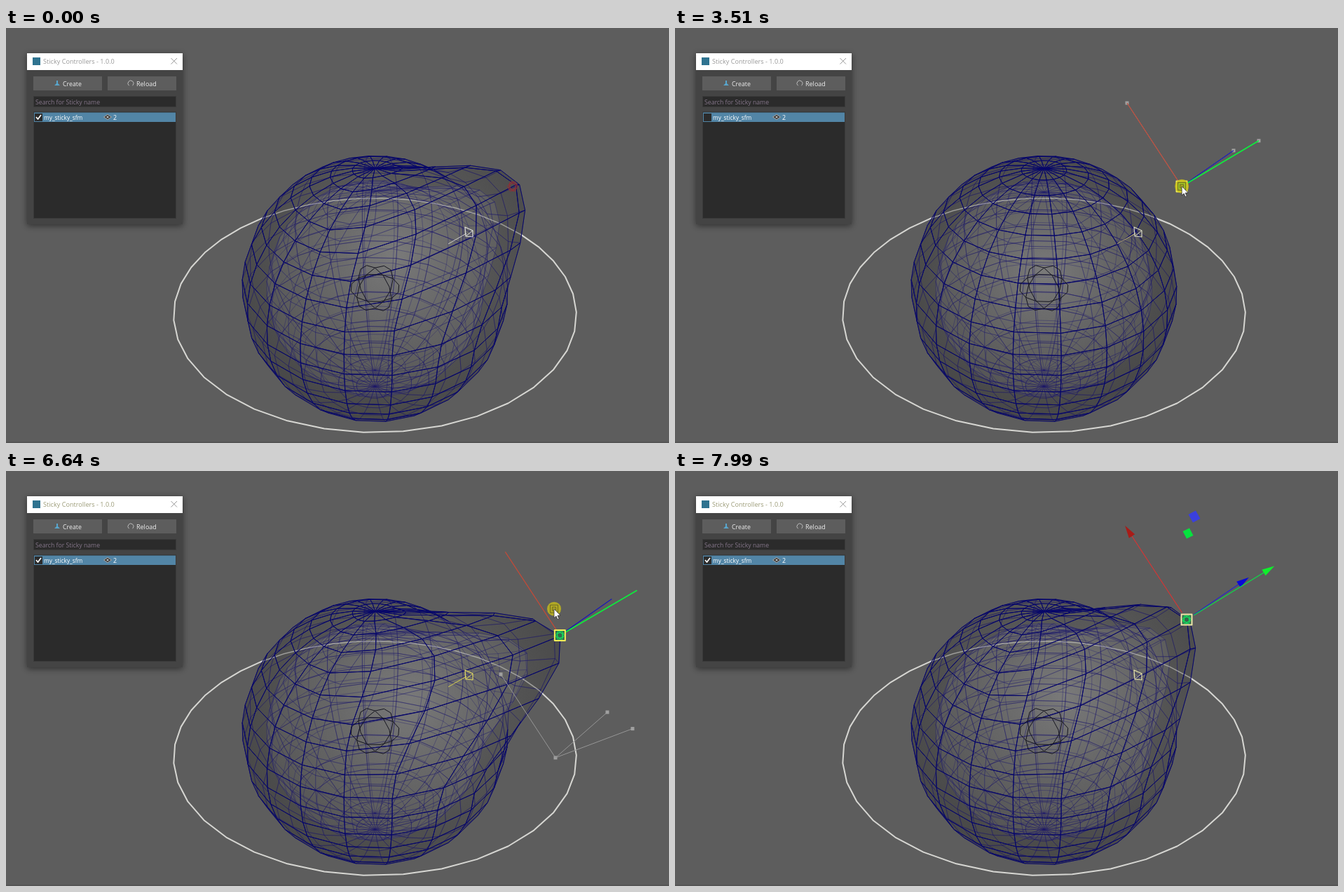
Animation of 946x592 px, one loop 8470 ms. Source, as an HTML page with a canvas:

```html
<!DOCTYPE html>
<html lang="en">
<head>
<meta charset="utf-8">
<title>Sticky Controllers</title>
<style>
html, body { margin: 0; width: 100%; height: 100%; overflow: hidden; background: #5d5d5d; }
canvas { display: block; }
</style>
</head>
<body>
<canvas id="stage" width="946" height="592"></canvas>
<script>
const ctx = document.getElementById('stage').getContext('2d');
const { sin, cos, hypot, min, max, PI } = Math;
const LOOP = 8470, RAD = PI / 180;

// Camera: pitch, yaw of the world axes, distance and focal length
const PITCH = 34.5 * RAD, YAW = 42.4 * RAD, DIST = 5.46, FOCAL = 1019;
const CX = 526.5, CY = 372;
const ANCHOR = [631, 308], HOME = [723, 226], PARKED = [784, 409];
const FALLOFF = 0.78;

// Cursor path: time, x, y
const PATH = [
  [270, 765, 358], [1090, 55, 138], [1160, 45, 128], [2690, 45, 128],
  [3440, 723, 226], [3510, 723, 226], [3790, 770, 168], [4070, 828, 190], [4280, 781, 201],
  [4400, 780, 202], [4770, 784, 409], [4840, 784, 409], [5220, 71, 140], [5360, 48, 124],
  [5840, 48, 124], [6110, 775, 402], [6180, 784, 409], [6450, 805, 300], [6640, 782, 197],
  [6900, 788, 108], [7060, 758, 140], [7240, 740, 145], [7400, 718, 170], [7580, 812, 160],
  [7780, 730, 212], [7919, 730, 212], [7920, 875, 481]
];

function cursorAt(t) {
  const i = PATH.findIndex(k => k[0] > t);
  if (i < 0) return PATH[PATH.length - 1].slice(1);
  if (i === 0) return PATH[0].slice(1);
  const [t0, x0, y0] = PATH[i - 1], [t1, x1, y1] = PATH[i];
  const u = (t - t0) / (t1 - t0);
  return [x0 + (x1 - x0) * u, y0 + (y1 - y0) * u];
}

// The dragged controller trails the cursor slightly
function controllerAt(t) {
  const lag = t - 70;
  return cursorAt(t < 6180 ? min(max(lag, 3510), 4770) : min(max(lag, 6180), 7780));
}

function toCamera(lat, az, r) {
  const up = r * sin(lat), front = r * cos(lat) * cos(az);
  return [
    r * cos(lat) * sin(az),
    up * cos(PITCH) - front * sin(PITCH),
    up * sin(PITCH) + front * cos(PITCH)
  ];
}

function project([x, y, z]) {
  const s = FOCAL / (DIST - z);
  return [CX + x * s, CY - y * s];
}

const CENTER = toCamera(PI / 4, YAW, 1);

function line(points, color, width = 1, close = false) {
  ctx.beginPath();
  points.forEach(p => ctx.lineTo(...p));
  if (close) ctx.closePath();
  ctx.strokeStyle = color;
  ctx.lineWidth = width;
  ctx.stroke();
}

function poly(points, color) {
  ctx.beginPath();
  points.forEach(p => ctx.lineTo(...p));
  ctx.fillStyle = color;
  ctx.fill();
}

function rect(x, y, w, h, color) {
  ctx.fillStyle = color;
  ctx.fillRect(x, y, w, h);
}

function text(str, x, y, size, color) {
  ctx.font = `${size}px "Open Sans", "Noto Sans", sans-serif`;
  ctx.fillStyle = color;
  ctx.fillText(str, x, y);
}

// Wireframe of a sphere pulled by the soft deformer, split by facing
function buildMesh(radius, pull) {
  const scale = (DIST - CENTER[2]) / FOCAL;
  const vertex = (row, col) => {
    const p = toCamera((row * 9 - 90) * RAD, YAW + col * 18 * RAD, radius);
    const d = min(hypot(p[0] - CENTER[0], p[1] - CENTER[1], p[2] - CENTER[2]) / FALLOFF, 1);
    const w = 1 - d * d * (3 - 2 * d);
    return project([p[0] + pull[0] * scale * w, p[1] - pull[1] * scale * w, p[2]]);
  };
  const front = new Path2D(), back = new Path2D();
  for (let r = 0; r < 20; r++) {
    for (let c = 0; c < 20; c++) {
      const q = [vertex(r, c), vertex(r, c + 1), vertex(r + 1, c + 1), vertex(r + 1, c)];
      const area = (q[2][0] - q[0][0]) * (q[3][1] - q[1][1]) - (q[2][1] - q[0][1]) * (q[3][0] - q[1][0]);
      const path = area < 0 ? front : back;
      q.forEach((p, i) => i ? path.lineTo(...p) : path.moveTo(...p));
      path.closePath();
    }
  }
  return { front, back };
}

function fillMesh(path, pull, inner, outer) {
  const x = CX + pull[0] * 0.3, y = 348 + pull[1] * 0.3;
  const g = ctx.createRadialGradient(x, y, 0, x, y, 195 + hypot(...pull) * 0.3);
  g.addColorStop(0, inner);
  g.addColorStop(1, outer);
  ctx.fillStyle = g;
  ctx.fill(path);
}

function strokeMesh(path, color, width) {
  ctx.strokeStyle = color;
  ctx.lineWidth = width;
  ctx.stroke(path);
}

function drawSphere(pull) {
  const outer = buildMesh(1, pull), inner = buildMesh(0.82, pull);
  const ring = Array.from({ length: 40 }, (_, i) => project(toCamera(0, YAW + i * 9 * RAD, 1.5)));
  line(ring, '#d6d6d2', 2, true);
  fillMesh(outer.front, pull, 'rgba(102,102,102,.88)', 'rgba(70,70,70,.88)');
  fillMesh(inner.front, pull, 'rgba(135,135,135,.6)', 'rgba(94,94,94,.4)');
  strokeMesh(outer.back, 'rgba(28,24,105,.5)', 0.8);
  strokeMesh(inner.back, 'rgba(34,30,110,.28)', 0.7);
  strokeMesh(inner.front, 'rgba(34,30,110,.42)', 0.8);
  ctx.save();
  ctx.clip(outer.front);
  line(ring, 'rgba(205,205,200,.6)', 1.3, true);
  ctx.restore();
  strokeMesh(outer.front, '#07076a', 1);
}

// Three crossed circles
function drawBall(x, y, r, color, segments) {
  const axes = [toCamera(0, YAW, r), toCamera(0, YAW - PI / 2, r), toCamera(PI / 2, 0, r)];
  axes.forEach((a, i) => {
    const b = axes[(i + 1) % 3];
    line(Array.from({ length: segments }, (_, k) => {
      const u = cos(k * 2 * PI / segments), v = sin(k * 2 * PI / segments);
      return [x + a[0] * u + b[0] * v, y - a[1] * u - b[1] * v];
    }), color, 1, true);
  });
}

function drawFlag(t) {
  const color = t < 3470 ? '#dededa' : t < 6180 ? '#d8d8c6' : t < 7850 ? '#e2da62' : '#e6e2ac';
  if (t < 7990) line([[631, 308], [657, 293]], t < 3470 ? '#d0d0cc' : t < 6180 ? '#c2b46e' : '#d8d04e');
  line([[655, 284], [666, 289], [666, 298], [656, 297]], color, 1.2, true);
  line([[656, 297], [666, 289]], color);
}

// Screen directions of the manipulator axes turn with height
const axesAt = y => ({
  red: [-78, -119],
  blue: [74, -45 - (y - 143) * 0.075],
  green: [110, -76 + (y - 143) * 0.13]
});

function drawArrow(x, y, [dx, dy], lineColor, tipColor) {
  const len = hypot(dx, dy), ux = dx / len, uy = dy / len;
  const bx = x + dx, by = y + dy;
  line([[x + ux * 12, y + uy * 12], [bx, by]], lineColor, 1.2);
  poly([
    [bx + ux * 18, by + uy * 18], [bx - uy * 5, by + ux * 5], [bx + uy * 5, by - ux * 5]
  ], tipColor);
}

function drawGizmo([x, y], dragging, start) {
  const axes = axesAt(y);
  if (dragging) {
    const ghost = axesAt(start[1]);
    rect(start[0] - 2.5, start[1] - 2.5, 5, 5, '#a0a0a0');
    for (const [dx, dy] of Object.values(ghost)) {
      const end = [start[0] + dx, start[1] + dy];
      line([start, end], '#969696');
      rect(end[0] - 2.5, end[1] - 2.5, 5, 5, '#a0a0a0');
    }
    const ray = (name, color, width) =>
      line([[x, y], [x + axes[name][0], y + axes[name][1]]], color, width);
    ray('red', '#c44a38', 1.2);
    ray('blue', '#1a1ab4', 1.3);
    ray('green', '#0cee3c', 1.7);
  } else {
    drawArrow(x, y, axes.red, '#d83434', y > 300 ? '#e01212' : '#a81c18');
    drawArrow(x, y, axes.blue, '#2828c8', '#0808d8');
    drawArrow(x, y, axes.green, '#0cdc48', '#10ee2c');
    const low = y > 300;
    const plane = (px, py, s, color) =>
      poly([[px - s, py - 3], [px + 2, py - s], [px + s, py + 3], [px - 2, py + s]], color);
    plane(x + (low ? 16 : 11), y - (low ? 128 : 147), 8.5, '#3a40de');
    plane(x + (low ? -1 : 2), y - (low ? 135 : 123), 7.5, '#06e23e');
  }
  rect(x - 7, y - 7, 14, 14, '#37664a');
  drawBall(x, y, 6.5, '#10e860', 8);
  ctx.strokeStyle = dragging ? '#f2ee58' : '#efe8a8';
  ctx.lineWidth = 2;
  ctx.strokeRect(x - 7.5, y - 7.5, 15, 15);
}

function drawPanel(active, checked, t) {
  ctx.save();
  ctx.shadowColor = 'rgba(0,0,0,.5)';
  ctx.shadowBlur = active ? 14 : 9;
  ctx.shadowOffsetY = 2;
  rect(30, 36, 222, 244, '#444');
  ctx.restore();
  rect(30, 36, 222, 24, '#fff');
  rect(38, 42, 11, 11, '#2f7390');
  const titleColor = active ? '#111' : t < 6180 ? '#999' : '#9c9c78';
  text('Sticky Controllers - 1.0.0', 53, 51, 9.15, titleColor);
  const cross = active ? '#222' : '#999';
  line([[235.5, 43], [244, 51.5]], cross);
  line([[244, 43], [235.5, 51.5]], cross);

  rect(39, 69, 98, 20, '#5d5d5d');
  rect(145, 69, 98, 20, '#5d5d5d');
  text('Create', 81, 83, 8.8, '#eee');
  text('Reload', 186, 83, 9, '#eee');
  poly([[69, 82], [72, 79], [72, 75], [74, 75], [74, 79], [77, 82]], '#58a5cc');
  ctx.beginPath();
  ctx.arc(178, 79, 4, 2.2, 7.2);
  ctx.strokeStyle = '#bbb';
  ctx.lineWidth = 1;
  ctx.stroke();

  rect(39, 97, 204, 16, '#3a3a3a');
  rect(40, 98, 202, 14, '#2b2b2b');
  text('Search for Sticky name', 42, 108.5, 8.7, '#85768a');

  rect(39, 119, 204, 153, active ? '#5285a6' : '#3a3a3a');
  rect(40, 120, 202, 151, '#2b2b2b');
  rect(40, 120.5, 202, 13.5, '#5285a6');
  rect(41, 122, 11, 11, '#2b2b2b');
  if (checked) line([[43, 127], [45.5, 130], [50, 124]], '#fff', 1.7);
  text('my_sticky_sfm', 54, 130.5, 8.3, '#fff');
  poly([[139, 127], [145, 123], [151, 127], [145, 131]], '#333');
  line([[139.5, 127], [145, 123.5], [150.5, 127], [145, 130.5]], '#ccc', 0.8, true);
  poly([[143, 127], [145, 125.7], [147, 127], [145, 128.3]], '#ddd');
  text('2', 153, 130.5, 8.8, '#fff');
}

function drawCursor([x, y], dragging) {
  ctx.beginPath();
  ctx.arc(x, y, 10, 0, 2 * PI);
  ctx.fillStyle = 'rgba(205,195,20,.75)';
  ctx.fill();
  if (dragging) {
    ctx.strokeStyle = '#6e6a20';
    ctx.lineWidth = 1;
    ctx.strokeRect(x - 5.5, y - 5.5, 11, 11);
    ctx.strokeRect(x - 2.5, y - 2.5, 5, 5);
  }
  const arrow = [[0, 0], [0, 13], [3, 10.3], [5, 15], [7, 14], [5, 9.5], [9, 9.3]]
    .map(([dx, dy]) => [x + dx, y + dy]);
  poly(arrow, '#fff');
  line(arrow, '#222', 0.7, true);
}

function draw(t) {
  const checked = t < 1160 || (t >= 2000 && t < 2690) || t >= 5770;
  const active = (t >= 1160 && t < 3470) || (t >= 5290 && t < 6180);
  const selected = t >= 3470;
  const dragging = selected && (t < 4840 || (t >= 6180 && t < 7850));
  const ctrl = controllerAt(t);
  const target = selected ? ctrl : [HOME[0] + 4, HOME[1] - 3];
  const pull = checked ? [target[0] - ANCHOR[0], target[1] - ANCHOR[1]] : [0, 0];

  rect(0, 0, 946, 592, '#5d5d5d');
  rect(0, 590, 946, 2, '#555');
  drawSphere(pull);
  drawBall(CX, 371, 35, '#15151f', 12);
  drawFlag(t);
  if (selected) drawGizmo(ctrl, dragging, t < 6180 ? HOME : PARKED);
  else drawBall(...HOME, 7.5, '#962c34', 8);
  drawPanel(active, checked, t);
  if (t >= 270 && t < 7990) drawCursor(cursorAt(t), dragging);
}

ctx.lineJoin = 'round';
function tick() {
  draw(performance.now() % LOOP);
  requestAnimationFrame(tick);
}
tick();
</script>
</body>
</html>
```
